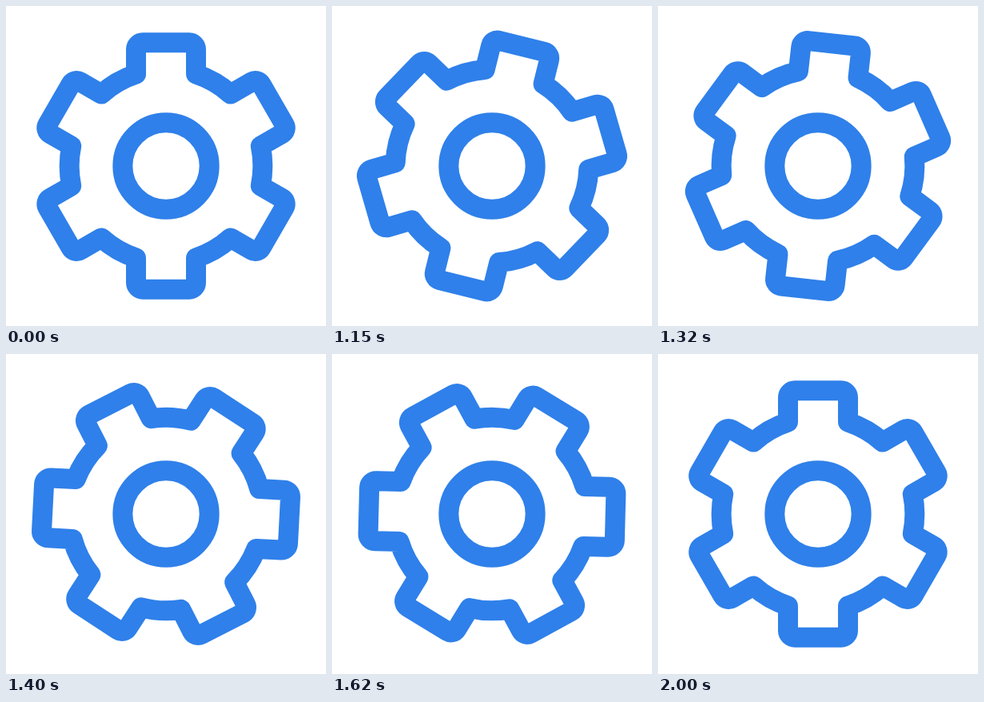
These frames come from a looping animation (400x400 px, 2.02 s). An HTML page:

```html
<!DOCTYPE html>
<html lang="en">
<head>
<meta charset="utf-8">
<title>Turning gear</title>
<style>
  html, body { margin: 0; width: 100%; height: 100%; overflow: hidden; background: #fff; }
  svg { display: block; width: 100%; height: 100%; }
</style>
</head>
<body>
<svg viewBox="-12 -12 24 24" fill="none" stroke="#2f80ea" stroke-width="1.5" stroke-linejoin="round">
  <path id="gear"/>
  <circle r="3.25"/>
</svg>
<script>
const LOOP = 2020, START = 1000, TURN = 1000, STEP = 25, ANGLE = 180;
const TEETH = 6, HALF = 2.25, TIP = 9.25, CORNER = 0.5, BODY = 7.25;
const gear = document.getElementById('gear');

function gearPath() {
  const root = Math.sqrt(BODY * BODY - HALF * HALF);
  let d = '';
  for (let i = 0; i < TEETH; i++) {
    const a = i * 2 * Math.PI / TEETH, c = Math.cos(a), s = Math.sin(a);
    const at = (x, y) => `${(x * c + y * s).toFixed(4)} ${(x * s - y * c).toFixed(4)}`;
    const arc = r => `A${r} ${r} 0 0 1 `;
    d += (i ? arc(BODY) : 'M') + at(-HALF, root)
      + 'L' + at(-HALF, TIP - CORNER) + arc(CORNER) + at(-HALF + CORNER, TIP)
      + 'L' + at(HALF - CORNER, TIP) + arc(CORNER) + at(HALF, TIP - CORNER)
      + 'L' + at(HALF, root);
  }
  return d + `A${BODY} ${BODY} 0 0 1 ${-HALF} ${-root}Z`;
}

// Cubic Bezier easing through (0.335, 0) and (0.375, 1).
function ease(p) {
  if (p <= 0) return 0;
  if (p >= 1) return 1;
  let lo = 0, hi = 1;
  for (let i = 0; i < 30; i++) {
    const s = (lo + hi) / 2, q = 1 - s;
    const x = 3 * q * q * s * 0.335 + 3 * q * s * s * 0.375 + s * s * s;
    if (x < p) lo = s; else hi = s;
  }
  return lo * lo * (3 - 2 * lo);
}

// Poses advance 40 times a second, shown on 10 ms ticks.
function poseTime(ms) {
  const tick = Math.floor((ms % LOOP + 0.01) / 10);
  return Math.floor((tick + 0.5) / 2.5) * STEP;
}

function draw(ms) {
  const turn = ANGLE * ease((poseTime(ms) - START) / TURN);
  gear.setAttribute('transform', `rotate(${turn.toFixed(3)})`);
}

gear.setAttribute('d', gearPath());
const origin = performance.now();
function frame() {
  draw(performance.now() - origin);
  requestAnimationFrame(frame);
}
frame();
</script>
</body>
</html>
```
